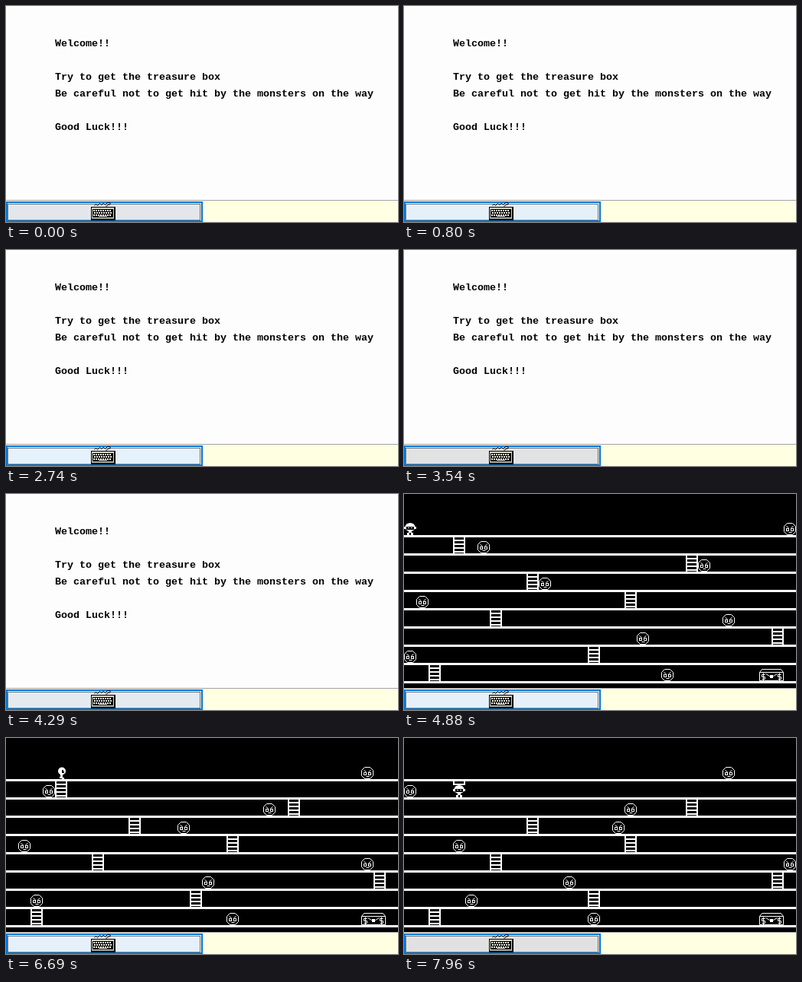
Animation of 512 by 284 pixels, one loop 8000 ms. Source, as an HTML page with a canvas:

```html
<!DOCTYPE html>
<html lang="en">
<head>
<meta charset="utf-8">
<title>Treasure ladders</title>
<style>
html, body { margin: 0; width: 100%; height: 100%; overflow: hidden; background: #fdfdfe; }
canvas { display: block; width: 512px; height: 284px; }
</style>
</head>
<body>
<canvas width="512" height="284"></canvas>
<script>
const ctx = document.querySelector('canvas').getContext('2d');
const LOOP = 8000, GAME_START = 4700;
const STEP = 512, STEP_ORIGIN = 5672, REDRAW_DELAY = 40;
const WALK_START = 5760, WALK_STEP = 230, CLIMB_TIME = 7300;
const PULSE = 2070, PULSE_PEAK = 600;

// One entry per floor: ladder centre, and a monster's place on its back-and-forth track.
const ladders = [null, 72, 376, 168, 296, 120, 488, 248, 40];
const monsterPhases = [33, 59, 41, 13, 0, 28, 46, 1, 44];

const cellTop = floor => 38 + 24 * floor;

function rect(color, x, y, w, h) {
  ctx.fillStyle = color;
  ctx.fillRect(x, y, w, h);
}

// Strokes polylines given as flat coordinate lists, on pixel centres.
function lines(color, ...paths) {
  ctx.strokeStyle = color;
  ctx.lineWidth = 1;
  for (const p of paths) {
    ctx.beginPath();
    for (let i = 0; i < p.length; i += 2) ctx.lineTo(p[i] + .5, p[i + 1] + .5);
    ctx.stroke();
  }
}

function at(x, y, draw) {
  ctx.save();
  ctx.translate(x, y);
  draw();
  ctx.restore();
}

function drawWelcome() {
  rect('#fdfdfe', 0, 0, 512, 255);
  ctx.fillStyle = '#000';
  ctx.font = 'bold 13.333px "Liberation Mono", monospace';
  ctx.textAlign = 'left';
  ctx.fillText('Welcome!!', 64, 53);
  ctx.fillText('Try to get the treasure box', 64, 97);
  ctx.fillText('Be careful not to get hit by the monsters on the way', 64, 119);
  ctx.fillText('Good Luck!!!', 64, 163);
}

function drawLadder(x, y) {
  rect('#fff', x - 8, y, 2, 21);
  rect('#fff', x + 6, y, 2, 21);
  for (let rung = 3; rung < 21; rung += 5) rect('#fff', x - 8, y + rung, 16, 2);
}

function clearCell(x, floor) {
  rect('#000', x - 8, cellTop(floor), 16, 16);
}

function drawMonster(x, floor) {
  clearCell(x, floor);
  at(x - 8, cellTop(floor), () => {
    lines('#fff',
      [4, 0, 11, 0, 15, 4, 15, 11, 11, 15, 4, 15, 0, 11, 0, 4, 4, 0],
      [3, 4, 6, 6], [12, 4, 9, 6], [6, 12, 10, 12]);
    ctx.strokeRect(3.5, 7.5, 3, 3);
    ctx.strokeRect(9.5, 7.5, 3, 3);
  });
}

function drawPlayer(x, floor, sideways) {
  clearCell(x, floor);
  at(x - 8, cellTop(floor), () => {
    ctx.fillStyle = '#fff';
    ctx.beginPath();
    if (sideways) {
      ctx.ellipse(9, 5.5, 5, 5, 0, 0, 7);
      ctx.fill();
      rect('#000', 9, 4, 3, 4);
      rect('#fff', 11, 4, 1, 2);
      rect('#fff', 7, 10, 3, 4);
      rect('#fff', 6, 13, 3, 2);
      rect('#fff', 9, 14, 3, 2);
    } else {
      ctx.ellipse(8, 5.5, 6.5, 5.5, 0, 0, 7);
      ctx.fill();
      rect('#000', 3, 5, 10, 4);
      rect('#fff', 5, 6, 2, 1);
      rect('#fff', 9, 6, 2, 1);
      rect('#fff', 0, 5, 2, 3);
      rect('#fff', 14, 5, 2, 3);
      rect('#fff', 6, 11, 4, 2);
      rect('#fff', 4, 13, 3, 3);
      rect('#fff', 9, 13, 3, 3);
    }
  });
}

function drawTreasure() {
  at(464, 230, () => {
    lines('#fff',
      [0, 15, 0, 4, 3, 0, 28, 0, 31, 4, 31, 15, 0, 15],
      [0, 4, 31, 4], [8, 6, 13, 9, 18, 9, 23, 6]);
    rect('#fff', 14, 8, 4, 4);
    for (const x of [3, 24]) {
      lines('#fff', [x + 4, 7, x, 7, x, 10, x + 4, 10, x + 4, 13, x, 13], [x + 2, 5, x + 2, 15]);
    }
  });
}

function monsterX(floor, step) {
  const phase = (monsterPhases[floor] + step + 64) % 64;
  return 8 + 16 * (phase < 32 ? phase : 63 - phase);
}

function drawGame(t) {
  const step = Math.floor((t - STEP_ORIGIN) / STEP);
  const sinceStep = t - STEP_ORIGIN - step * STEP;
  rect('#000', 0, 0, 512, 255);
  ladders.forEach((x, floor) => x && drawLadder(x, cellTop(floor) - 5));
  drawTreasure();
  monsterPhases.forEach((_, floor) => {
    if (sinceStep < REDRAW_DELAY) clearCell(monsterX(floor, step - 1), floor);
    drawMonster(monsterX(floor, step), floor);
  });
  const walked = Math.max(0, Math.min(4, Math.floor((t - WALK_START) / WALK_STEP) + 1));
  const climbed = t >= CLIMB_TIME;
  drawPlayer(8 + 16 * walked, climbed ? 1 : 0, walked > 0 && !climbed);
  for (let floor = 0; floor < 9; floor++) rect('#fff', 0, cellTop(floor) + 16, 512, 3);
}

function mix(a, b, k) {
  return `rgb(${a.map((v, i) => Math.round(v + (b[i] - v) * k))})`;
}

function drawKeyboard() {
  at(111, 257, () => {
    lines('#000', [4, 5, 6, 3, 8, 5, 11, 2, 13, 4, 16, 2, 18, 4, 21, 1, 24, 1, 25, 3, 22, 4, 19, 6]);
    rect('#000', 0, 7, 32, 18);
    rect('#d8d4c4', 1, 8, 29, 14);
    rect('#808074', 1, 22, 29, 1);
    rect('#000', 2, 10, 27, 11);
    for (let row = 0; row < 3; row++) {
      for (let key = 0; key < 8; key++) rect('#f4f2e8', 3 + key * 3 + row % 2, 11 + row * 3, 2, 2);
    }
    rect('#f4f2e8', 10, 19, 11, 1);
  });
}

function drawButton(t) {
  const glow = (1 + Math.cos((t - PULSE_PEAK) / PULSE * 2 * Math.PI)) / 2;
  rect('#0078d7', 0, 257, 257, 27);
  rect(mix([225, 225, 225], [229, 241, 251], glow), 2, 259, 253, 23);
  ctx.setLineDash([1, 1]);
  ctx.lineWidth = 1;
  ctx.strokeStyle = '#000';
  ctx.strokeRect(2.5, 260.5, 251, 21);
  ctx.setLineDash([]);
  drawKeyboard();
}

function drawPanel(t) {
  rect('#a0a0a0', 0, 255, 512, 1);
  rect('#fff', 0, 256, 512, 1);
  rect('#ffffe1', 256, 257, 256, 27);
  if (t >= 5600 && t < 6500) {
    ctx.fillStyle = '#000';
    ctx.font = 'bold 14.667px "Liberation Serif", serif';
    ctx.textAlign = 'center';
    ctx.fillText('Right', 384, 275);
  }
  drawButton(t);
}

function frame() {
  const t = performance.now() % LOOP;
  if (t < GAME_START) drawWelcome();
  else drawGame(t);
  drawPanel(t);
  requestAnimationFrame(frame);
}
frame();
</script>
</body>
</html>
```
